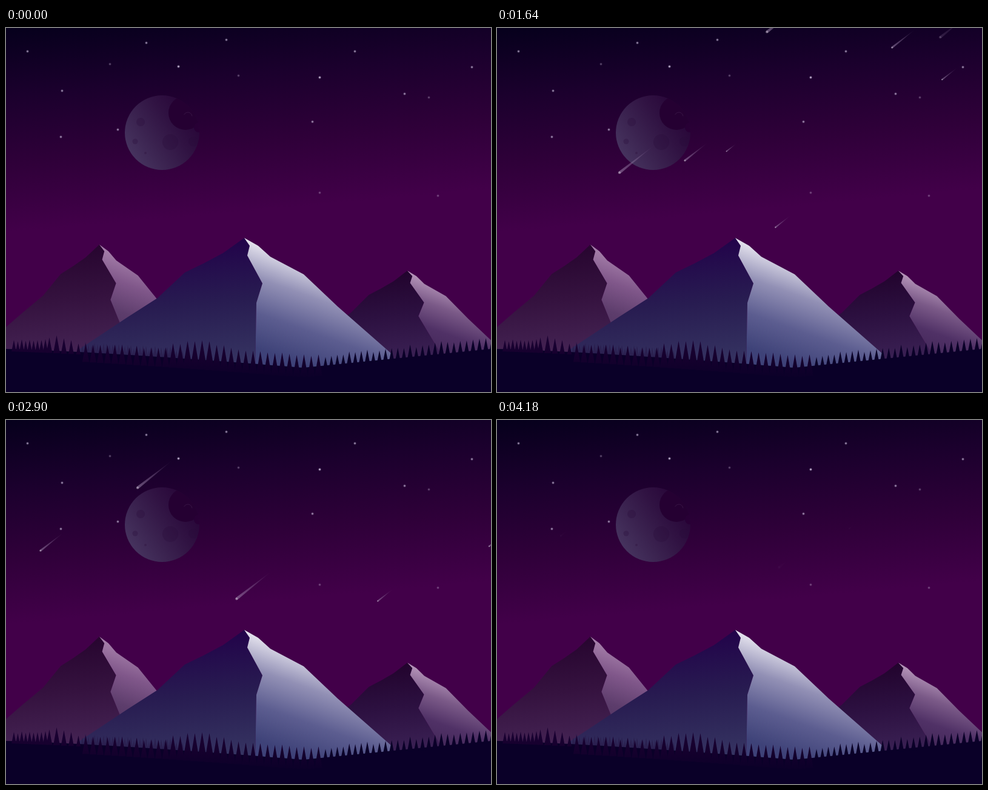
Recreate the animation shown at these times as an HTML page with a canvas. Size 800 by 600 pixels, loop 4.38 s.

```html
<!DOCTYPE html>
<html lang="en">
<head>
<meta charset="utf-8">
<title>Meteor night</title>
<style>
html, body { margin: 0; width: 100%; height: 100%; overflow: hidden; background: #06001c; }
canvas { display: block; }
</style>
</head>
<body>
<canvas id="stage" width="800" height="600"></canvas>
<script>
const LOOP = 4380, LAST = 4180, STEP = 20, FLIGHT = 2080;
const ctx = document.getElementById('stage').getContext('2d');
const scene = document.createElement('canvas');
scene.width = 800;
scene.height = 600;
const g = scene.getContext('2d');

let seed = 7;
const random = () => (seed = seed * 16807 % 2147483647) / 2147483647;
const bump = (x, center, width) => Math.exp(-(((x - center) / width) ** 2));

function gradient(c, x0, y0, x1, y1, colors) {
  const fill = c.createLinearGradient(x0, y0, x1, y1);
  colors.forEach((color, i) => fill.addColorStop(i / (colors.length - 1), color));
  return fill;
}

function poly(c, points, fill) {
  c.beginPath();
  points.forEach(([x, y]) => c.lineTo(x, y));
  c.closePath();
  c.fillStyle = fill;
  c.fill();
}

function disc(c, x, y, r, fill) {
  c.beginPath();
  c.arc(x, y, r, 0, 7);
  c.fillStyle = fill;
  c.fill();
}

function drawSky() {
  g.fillStyle = gradient(g, 0, 0, 30, 335, ['#06001c', '#1b002d', '#2f0039', '#420049']);
  g.fillRect(0, 0, 800, 600);
}

function drawStars(light, points) {
  for (const [x, y] of points) {
    disc(g, x + .5, y + .5, 2.2, `rgba(190,170,215,${light * .4})`);
    disc(g, x + .5, y + .5, 1.3, `rgba(225,215,235,${light * .8})`);
  }
}

function drawMoon() {
  g.save();
  g.beginPath();
  g.arc(257.5, 172.5, 61.5, 0, 7);
  g.clip();
  g.fillStyle = gradient(g, 203, 212, 312, 140, ['#473560', '#3b2350', '#301242', '#270437']);
  g.fillRect(190, 105, 130, 135);
  [[213, 187, 4.5], [222, 155, 7], [230, 206, 2], [271, 188, 13], [309, 187, 8]]
    .forEach(([x, y, r]) => disc(g, x, y, r, 'rgba(42,12,58,.3)'));
  disc(g, 296, 140, 28, '#250032');
  disc(g, 318, 164, 8, '#280035');
  g.restore();
  g.strokeStyle = 'rgba(74,42,88,.5)';
  g.beginPath();
  g.arc(300, 146, 7, 3.6, 6.2);
  g.stroke();
}

// One outline, relative to the peak, shared by all three mountains
const BASE = 565;
const leftSlope = [[-273, 184], [-193, 131], [-143, 99], [-98, 57], [-67, 42], [-35, 25], [0, 0]];
const rightSlope = [[0, 0], [23, 13], [43, 31], [98, 60], [154, 113], [243, 191]];
const ridge = [[9, 13], [5, 29], [30, 75], [20, 107]];

function drawMountain(x, y, sx, sy, foot, dark, light) {
  const place = scale => ([dx, dy]) => [x + dx * scale, y + dy * sy];
  const crest = ridge.map(place((1 + sx * .3) / 1.3)).concat([[x + foot, BASE]]);
  const left = leftSlope.map(place(sx)), right = rightSlope.map(place(sx));
  const [leftEnd] = left, rightEnd = right[right.length - 1];
  poly(g, [...left, ...crest, [leftEnd[0], BASE]],
    gradient(g, x, y, x + 20 * sy, y + 200 * sy, dark));
  poly(g, [...right, [rightEnd[0], BASE], ...crest.reverse()],
    gradient(g, x, y, x - 55 * sy, y + 155 * sy, light));
}

function drawMountains() {
  drawMountain(154, 357, .65, .85, 66, ['#27052f', '#35123f', '#442353'], ['#a882ac', '#80578a', '#5d3d6c', '#4f315f']);
  drawMountain(662, 400, .65, .7, 72, ['#22032d', '#2c1040', '#3a2053'], ['#b898bc', '#7b5a88', '#503166', '#432759']);
  drawMountain(393, 346, 1, 1, 18, ['#22034a', '#281c51', '#353361'], ['#e8e6f0', '#9290b5', '#5c5d90', '#3e4278']);
}

const groundAt = x => x < 490 ? 529 + 31 * (x / 490) ** 1.3 : 560 - (x - 490) * .1;

function tree(x, height, depth, fill) {
  const base = groundAt(x), half = (height + depth) * .15 + 1;
  poly(g, [[x, base - height], [x + half, base + depth], [x - half, base + depth]], fill);
}

function drawForest() {
  const navy = '#0a0028';
  for (let x = 126; x < 296; x += 5) tree(x, 11 + 7 * random(), 4, 'rgba(42,30,76,.75)');

  const ground = [[0, 600]];
  for (let x = 0; x <= 800; x += 10) ground.push([x, groundAt(x)]);
  poly(g, [...ground, [800, 600]], navy);
  for (let x = 527; x < 806; x += 8 + x / 300) tree(x, 6 + x / 75 + 6 * random(), 4, navy);

  const bark = gradient(g, 0, 510, 0, 580, ['#1a0032', '#15002d', navy]);
  for (let x = 13; x < 525; x += x < 66 ? 6.5 : 12) {
    const height = 12 + 9 * bump(x, 85, 22) + 18 * bump(x, 322, 48) + 9 * bump(x, 460, 60);
    tree(x, height + 5 * random(), x > 130 ? 16 : 4, bark);
  }
}

// Each wave runs from its largest meteor to its smallest: start x, y and end x, y
const waves = [
  { start: 150, paths: [[489, -10, 132, 299], [761, -157, 200, 310], [1023, -96, 322, 432], [853, -190, 263, 299]] },
  { start: 700, paths: [[631, -142, 197, 205], [768, -64, 496, 161], [934, -75, 467, 299], [672, -148, 243, 195]] },
  { start: 1390, paths: [[749, 1, 297, 361], [327, -81, -118, 275], [915, 57, 545, 353]] },
  { start: 1750, paths: [[540, -147, -18, 300], [381, -44, -179, 404], [992, 52, 655, 322], [1056, -121, 656, 199]] },
  { start: 2110, paths: [[947, -133, 465, 243], [566, -177, 105, 191], [944, -111, 581, 179]] }
];

function drawMeteor([x0, y0, x1, y1], size, u) {
  const p = u * u * (3 - 2 * u);
  const x = x0 + (x1 - x0) * p, y = y0 + (y1 - y0) * p;
  const light = Math.min(1, u / .3, (1.01 - u) / .28);
  const r = .5 + size * .03;
  const tail = size * Math.min(1, .2 + light);
  const endX = x + tail, endY = y - tail * .785;
  const nx = .617 * r, ny = .787 * r;
  ctx.globalAlpha = light;
  poly(ctx, [[x - nx, y - ny], [endX, endY], [x + nx, y + ny]],
    gradient(ctx, x, y, endX, endY, ['rgba(175,155,190,.5)', 'rgba(150,125,165,.35)', 'rgba(130,100,150,.05)']));
  disc(ctx, x, y, r * .9, 'rgba(205,192,212,.6)');
  ctx.globalAlpha = 1;
}

function frame(now) {
  const time = Math.min(LAST, Math.floor(now % LOOP / STEP) * STEP);
  ctx.drawImage(scene, 0, 0);
  for (const { start, paths } of waves) {
    const u = (time - start) / FLIGHT;
    if (u > 0 && u < 1) paths.forEach((path, rank) => drawMeteor(path, 56 * .66 ** rank, u));
  }
  requestAnimationFrame(frame);
}

drawSky();
drawStars(1, [[284, 63], [517, 81]]);
drawStars(.7, [[35, 38], [231, 24], [363, 19], [92, 103], [184, 167], [90, 179], [575, 38], [768, 64], [657, 108], [505, 154]]);
drawStars(.35, [[171, 59], [383, 78], [697, 114], [517, 271], [712, 276]]);
drawMoon();
drawMountains();
drawForest();
requestAnimationFrame(frame);
</script>
</body>
</html>
```
